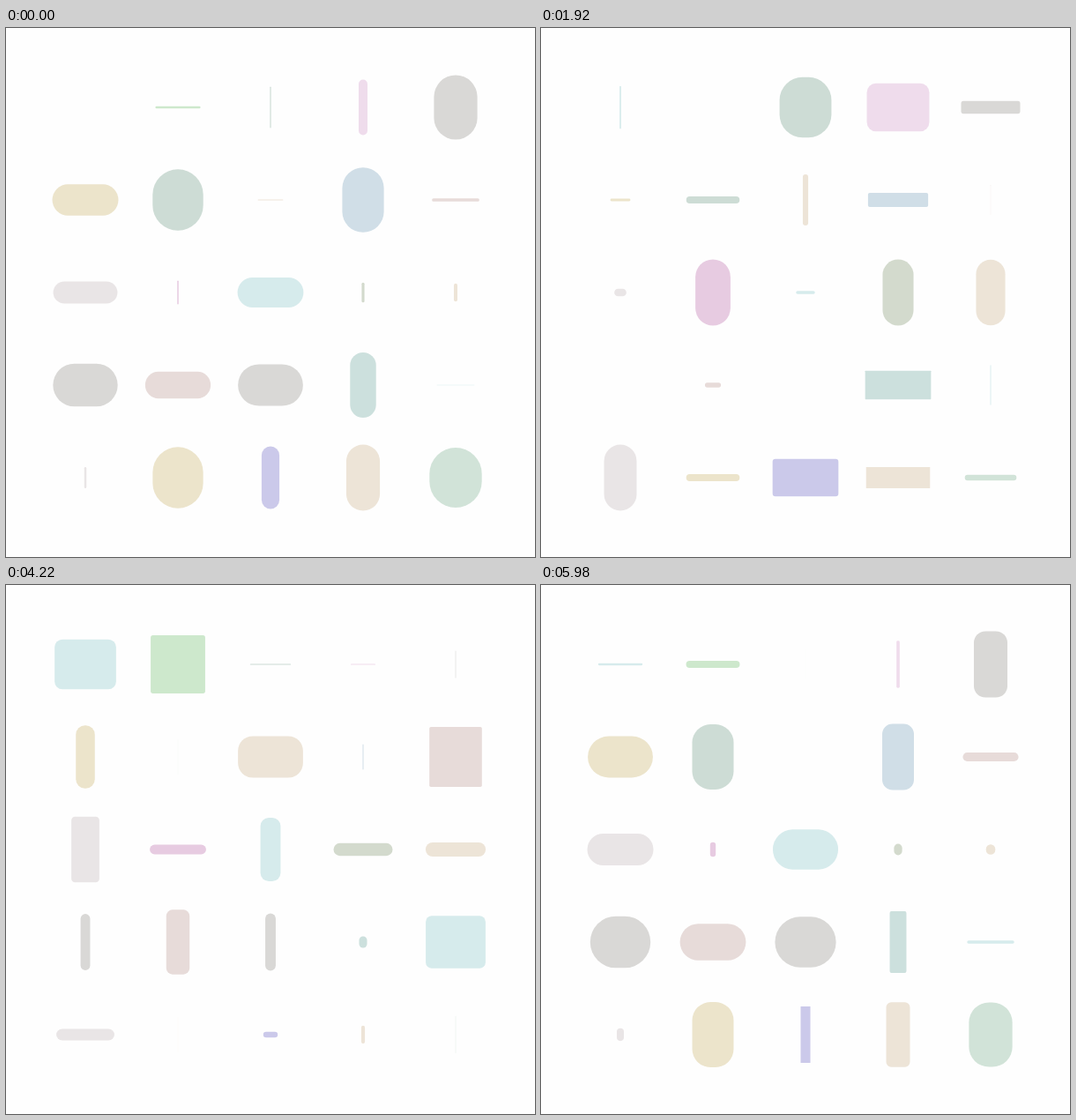
These frames come from a looping animation (600 px wide and 600 px high, 6000 ms). An HTML page with a canvas:

```html
<!DOCTYPE html>
<html lang="en">
<head>
<meta charset="utf-8">
<title>Breathing tiles</title>
<style>
  html, body { margin: 0; width: 100%; height: 100%; overflow: hidden; background: #fefefe; }
  canvas { display: block; width: 600px; height: 600px; }
</style>
</head>
<body>
<canvas id="stage" width="600" height="600"></canvas>
<script>
const ctx = document.getElementById('stage').getContext('2d');
const LOOP = 6000, STEP = 20;
const COLS = 5, FIRST = 90, GAP = 105, HALF = 37.5;

const aqua = '#d6ebec', sage = '#cddcd5', grey = '#d9d8d6', straw = '#ece4cb',
      sand = '#ede4d7', rose = '#e7dbd9', mist = '#e9e5e6';

// Row by row: colour and phase in degrees
const tiles = [
  [aqua, 177.4], ['#cde8cc', 158.7], [sage, -75.4], ['#efdcec', -47.2], [grey, 18.2],
  [straw, 93], [sage, 32.1], [sand, -166.8], ['#d0dee7', 15], [rose, 154.3],
  [mist, 109.4], ['#e7cbe1', -106.5], [aqua, 95.2], ['#d3dacd', -113.7], [sand, -116.7],
  [grey, 72.9], [rose, 101.1], [grey, 75.1], ['#cce0dd', -12.4], [aqua, 172.2],
  [mist, -110.9], [straw, 31.9], ['#cbc9ea', -27.5], [sand, 1], ['#d1e3d8', 35.7]
];

// Swings between 0 and the full tile size
const swell = wave => HALF * (1 + wave);

function drawTile([color, degrees], i, t) {
  const phase = degrees * Math.PI / 180;
  const x = FIRST + GAP * (i % COLS);
  const y = FIRST + GAP * Math.floor(i / COLS);
  const w = swell(Math.sin(phase + t));
  const h = swell(Math.cos(phase + t));
  const r = Math.min(swell(Math.cos(phase + t * 5 / 3)), w / 2, h / 2);
  ctx.fillStyle = color;
  ctx.beginPath();
  ctx.roundRect(x - w / 2, y - h / 2, w, h, r);
  ctx.fill();
}

function draw(now) {
  const t = Math.floor((now % LOOP) / STEP) * STEP / 1000;
  ctx.fillStyle = '#fefefe';
  ctx.fillRect(0, 0, 600, 600);
  tiles.forEach((tile, i) => drawTile(tile, i, t));
}

let start = null;
function tick(now) {
  if (start === null) start = now;
  draw(Math.max(0, now - start));
  requestAnimationFrame(tick);
}
draw(0);
requestAnimationFrame(tick);
</script>
</body>
</html>
```
